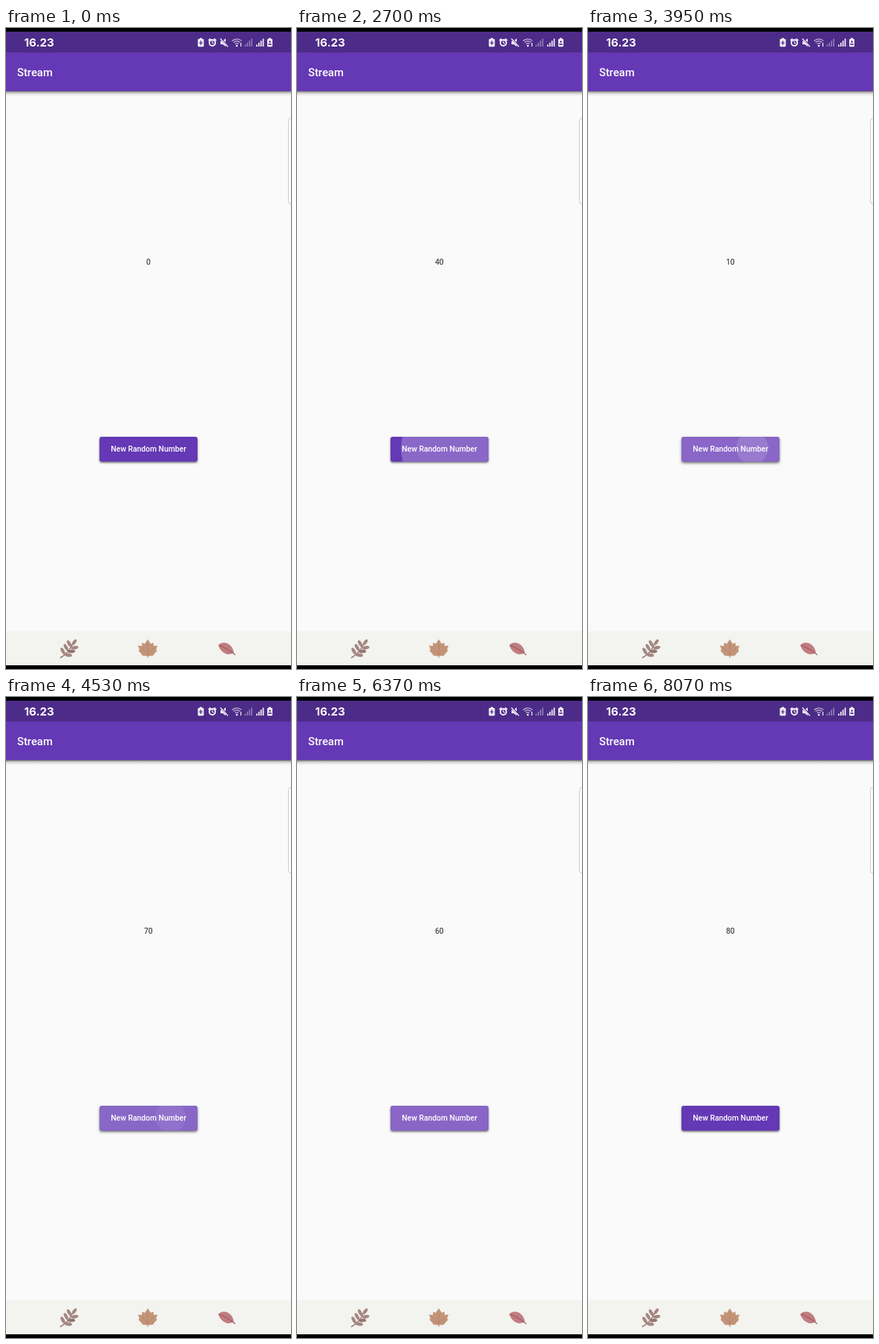
Write an HTML page with a canvas that moves like this. It is 384x864 px and loops after 9030 ms.

```html
<!DOCTYPE html>
<html lang="en">
<head>
<meta charset="utf-8">
<title>Stream</title>
<style>
  html, body { margin: 0; width: 100%; height: 100%; overflow: hidden; background: #fafafa; }
  canvas, svg { position: absolute; left: 0; top: 0; width: 384px; height: 864px; }
  text { font-family: Roboto, sans-serif; fill: #fff; }
  .clock { font: 700 15.2px Inter, sans-serif; }
  .title { font-size: 14.8px; font-weight: 500; }
  .label { font-size: 10.36px; font-weight: 500; text-anchor: middle; }
  .number { font-size: 10.36px; text-anchor: middle; fill: #212121; }
</style>
</head>
<body>
<canvas id="stage"></canvas>
<svg viewBox="0 0 384 864">
  <text class="clock" x="24.5" y="25">16.23</text>
  <text class="title" x="15" y="65">Stream</text>
  <text class="number" id="number" x="191.8" y="319">0</text>
  <text class="label" x="192" y="571">New Random Number</text>
</svg>
<script>
const W = 384, H = 864, LOOP = 9030;
const canvas = document.getElementById('stage');
const number = document.getElementById('number');
const dpr = window.devicePixelRatio || 1;
canvas.width = W * dpr;
canvas.height = H * dpr;
const ctx = canvas.getContext('2d');
ctx.scale(dpr, dpr);

const PURPLE = '#6538b5', STATUS = '#4d2b88', LIGHT = '#f6f3fa';
const INK_ALPHA = .24;
const button = { x: 126, y: 551, w: 132, h: 33.5, r: 3 };

// Release times of the taps and the number each one produces.
const releases = [1430, 1755, 2035, 2315, 2612, 2870, 3130, 3397, 3695, 3995,
  4290, 4595, 4900, 5210, 5520, 5830, 6140, 6470, 6735];
const values = [80, 10, 60, 30, 40, 90, 50, 20, 10, 30, 70, 20, 90, 40, 10, 50, 60, 30, 80];
const taps = releases.map((up, i) => ({
  up, down: up - (i ? 85 : 140), value: values[i], x: 222, y: 566
}));

const clamp = v => Math.max(0, Math.min(1, v));
const mix = (a, b, p) => a + (b - a) * p;
const ink = alpha => `rgba(255,255,255,${INK_ALPHA * alpha})`;

// cubic-bezier(.25, .1, .25, 1)
function ease(x) {
  const bez = (a, b, s) => 3 * a * s * (1 - s) ** 2 + 3 * b * s * s * (1 - s) + s ** 3;
  let lo = 0, hi = 1;
  for (let i = 0; i < 20; i++) {
    const mid = (lo + hi) / 2;
    if (bez(.25, .25, mid) < x) lo = mid; else hi = mid;
  }
  return bez(.1, 1, lo);
}

function rect(x, y, w, h, color) {
  ctx.fillStyle = color;
  ctx.fillRect(x, y, w, h);
}

function poly(points, color) {
  ctx.fillStyle = color;
  ctx.beginPath();
  points.forEach(([x, y]) => ctx.lineTo(x, y));
  ctx.fill();
}

function line(x1, y1, x2, y2, color, width) {
  ctx.strokeStyle = color;
  ctx.lineWidth = width;
  ctx.beginPath();
  ctx.moveTo(x1, y1);
  ctx.lineTo(x2, y2);
  ctx.stroke();
}

function arc(x, y, r, from, to, color, width) {
  ctx.strokeStyle = color;
  ctx.lineWidth = width;
  ctx.beginPath();
  ctx.arc(x, y, r, from, to);
  ctx.stroke();
}

function ellipse(x, y, rx, ry, angle, color) {
  ctx.fillStyle = color;
  ctx.beginPath();
  ctx.ellipse(x, y, rx, ry, angle, 0, Math.PI * 2);
  ctx.fill();
}

function roundRect(x, y, w, h, r) {
  ctx.beginPath();
  ctx.roundRect(x, y, w, h, r);
}

function battery(x, y, w, h) {
  rect(x + w / 2 - 1.5, y, 3, 2, LIGHT);
  ctx.fillStyle = LIGHT;
  roundRect(x, y + 1.3, w, h - 1.3, 1.2);
  ctx.fill();
}

function signal(x, lit) {
  for (let i = 0; i < 4; i++) {
    const h = 2.5 + i * 2.7;
    rect(x + i * 2.9, 25 - h, 1.7, h, i < lit ? LIGHT : '#8f7bb5');
  }
}

function statusIcons() {
  battery(258.5, 13.5, 8, 11.8);
  line(262.5, 17, 262.5, 23, STATUS, 1.2);
  line(260, 20, 265, 20, STATUS, 1.2);

  arc(278, 20, 4, 0, Math.PI * 2, LIGHT, 1.9);
  line(278, 17.5, 278, 20.3, LIGHT, 1.2);
  line(278, 20.3, 280, 21, LIGHT, 1.2);
  line(272.8, 17, 275.6, 14.4, LIGHT, 1.8);
  line(280.4, 14.4, 283.2, 17, LIGHT, 1.8);

  poly([[289, 17.5], [292, 17.5], [296, 14], [296, 25], [292, 22], [289, 22]], LIGHT);
  line(289, 14, 299.5, 25, STATUS, 2.6);
  line(288.8, 14.3, 299, 25.2, LIGHT, 1.3);

  for (const r of [3.3, 6.3, 9.2]) arc(311, 24, r, -2.35, -.8, '#c3b6d6', 1.2);
  ellipse(311, 24, 1.3, 1.3, 0, LIGHT);
  line(316.5, 20, 316.5, 25, LIGHT, 1.2);

  signal(321.5, 0);
  signal(337, 4);
  battery(352, 13.5, 7, 11.8);
  ellipse(355.5, 18.5, 1.3, 1.3, 0, STATUS);
  rect(353.3, 21, 4.4, 1.7, STATUS);
}

function herb() {
  const tone = '#a48783', dark = '#927570';
  ctx.strokeStyle = dark;
  ctx.lineWidth = 1.5;
  ctx.beginPath();
  ctx.moveTo(73, 849);
  ctx.quadraticCurveTo(84, 843, 90, 830);
  ctx.stroke();
  ellipse(92, 828, 4.5, 2.2, -.95, tone);
  for (let i = 0; i < 3; i++) {
    const x = 79 + i * 4.3, y = 844.5 - i * 5;
    ellipse(x - 2.4, y - 4.6, 5, 2.2, -2.1, tone);
    ellipse(x + 5, y + .8, 5, 2.3, .1 - i * .15, i === 1 ? dark : tone);
  }
}

function maple() {
  const half = [[0, -12.5], [4, -6.5], [7.5, -8], [8, -3.5], [13.2, -4], [11.2, 1],
    [12.5, 3], [9, 6.5], [7, 9.5], [2, 10]];
  const left = half.slice(1).reverse().map(([x, y]) => [-x, y]);
  poly([...half, ...left].map(([x, y]) => [191 + x, 836.5 + y]), '#c39478');
  line(191, 830, 191, 849, '#b3836a', 1);
  for (const s of [-1, 1]) line(191, 844, 191 + s * 8, 836, '#b3836a', .8);
}

function fallenLeaf() {
  ctx.fillStyle = '#c07d80';
  ctx.beginPath();
  ctx.moveTo(286, 832);
  ctx.bezierCurveTo(292, 825, 305, 829, 307, 842);
  ctx.bezierCurveTo(299, 847, 290, 843, 286, 832);
  ctx.fill();
  ctx.strokeStyle = '#955a60';
  ctx.lineWidth = 1.2;
  ctx.beginPath();
  ctx.moveTo(287, 832);
  ctx.quadraticCurveTo(298, 836, 309, 845);
  ctx.stroke();
}

function scene() {
  rect(0, 0, W, H, '#fafafa');
  const shade = ctx.createLinearGradient(0, 85, 0, 92);
  shade.addColorStop(0, 'rgba(0,0,0,.6)');
  shade.addColorStop(.25, 'rgba(0,0,0,.26)');
  shade.addColorStop(.6, 'rgba(0,0,0,.08)');
  shade.addColorStop(1, 'rgba(0,0,0,0)');
  rect(0, 85, W, 7, shade);
  rect(0, 33, W, 52, PURPLE);
  rect(0, 5, W, 28, STATUS);
  rect(0, 0, W, 5, '#000');
  statusIcons();

  roundRect(380.5, 121.5, 12, 116, 4);
  ctx.fillStyle = '#fcfcfb';
  ctx.fill();
  ctx.strokeStyle = '#cbcbc6';
  ctx.lineWidth = 1;
  ctx.stroke();

  rect(0, 813, W, 46, '#f3f3ef');
  herb();
  maple();
  fallenLeaf();
  rect(0, 859, W, 5, '#000');
}

function pressLevel(t) {
  let level = 0;
  for (const { down, up } of taps) {
    if (t < down) break;
    const rise = (Math.min(t, up) - down) / 200;
    const fall = Math.max(0, t - up) / 200;
    level = Math.max(level, clamp(rise - fall));
  }
  return level;
}

function ripple(tap, t) {
  if (t < tap.down || t > tap.up + 375) return;
  const held = (Math.min(t, tap.up) - tap.down) / 1000;
  const p = ease(mix(held, 1, clamp((t - tap.up) / 225)));
  const alpha = clamp((t - tap.down) / 75) * (1 - clamp((t - tap.up - 225) / 150));
  const cx = button.x + button.w / 2, cy = button.y + button.h / 2;
  const reach = Math.hypot(button.w, button.h) / 2;
  const r = mix(reach * .3, reach + 5, p);
  ellipse(mix(tap.x, cx, p), mix(tap.y, cy, p), r, r, 0, ink(alpha));
}

function drawButton(t) {
  const { x, y, w, h, r } = button;
  const level = pressLevel(t);
  ctx.save();
  ctx.shadowColor = 'rgba(0,0,0,.55)';
  ctx.shadowOffsetY = mix(1.4, 4, level) * dpr;
  ctx.shadowBlur = mix(3, 7, level) * dpr;
  ctx.fillStyle = PURPLE;
  roundRect(x, y, w, h, r);
  ctx.fill();
  ctx.restore();

  ctx.save();
  roundRect(x, y, w, h, r);
  ctx.clip();
  rect(x, y, w, h, ink(level));
  taps.forEach(tap => ripple(tap, t));
  ctx.restore();
}

function draw(now) {
  const t = now % LOOP;
  scene();
  drawButton(t);
  const value = taps.reduce((v, tap) => t >= tap.up ? tap.value : v, 0);
  if (number.textContent !== String(value)) number.textContent = value;
}

const start = performance.now();
function tick() {
  draw(performance.now() - start);
  requestAnimationFrame(tick);
}
tick();
</script>
</body>
</html>
```
